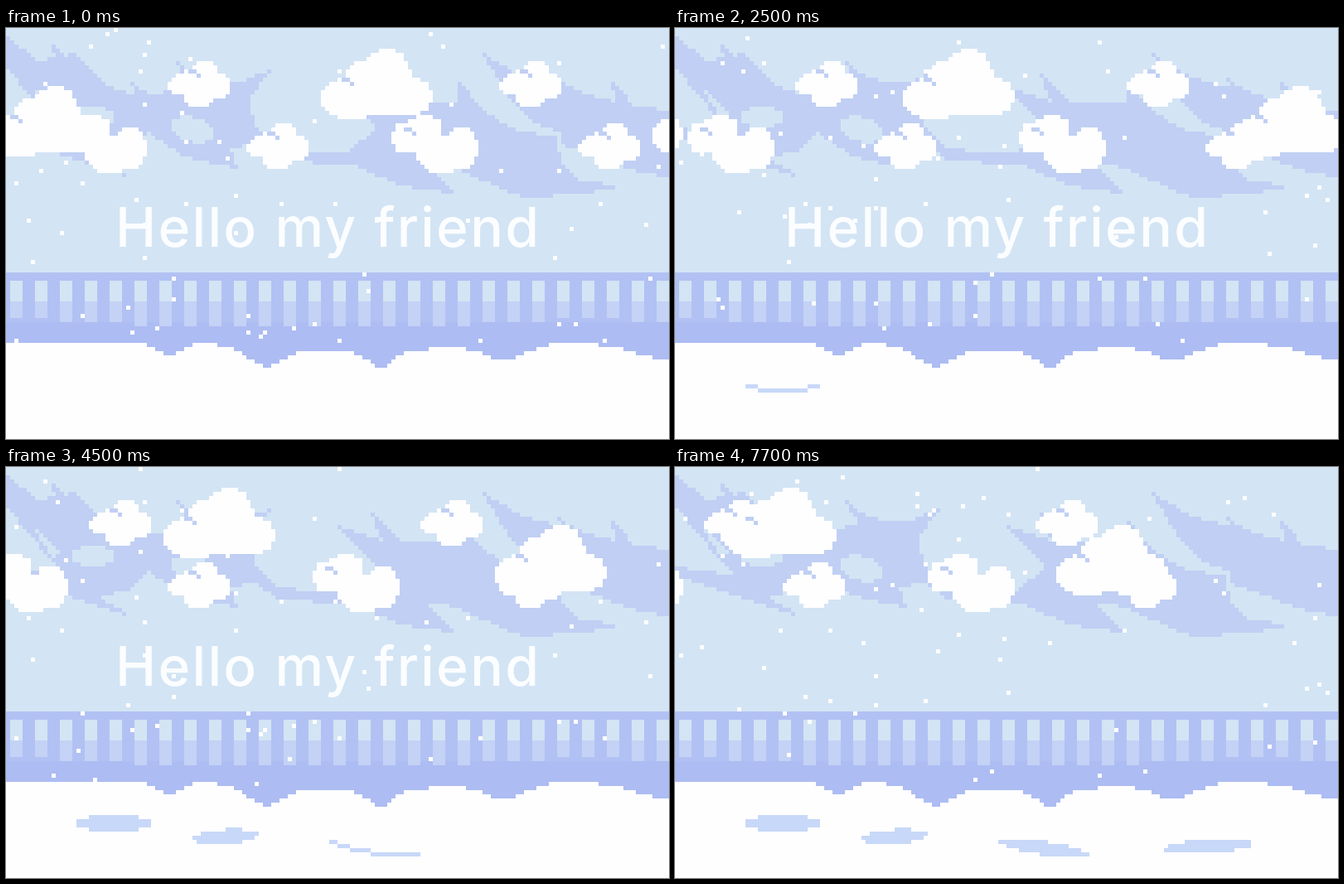
Animation of 800x496 px, one loop 7800 ms. Source, as an HTML page with a canvas:

```html
<!DOCTYPE html>
<html lang="en">
<head>
<meta charset="utf-8">
<title>Snowy day</title>
<style>
html, body { margin: 0; width: 100%; height: 100%; overflow: hidden; background: #d3e4f4; }
canvas { position: absolute; left: 0; top: 0; }
#hello {
  position: absolute; left: 132px; top: 207px; white-space: nowrap;
  font: 500 66px/1 Inter, "Open Sans", sans-serif; letter-spacing: 2.3px; color: #fbfdff;
}
</style>
</head>
<body>
<canvas id="stage" width="800" height="496"></canvas>
<div id="hello">Hello my friend</div>
<script>
// All drawing is on a grid of 5px cells.
const CELL = 5, COLS = 160, ROWS = 100;
const STEP = 100, STEPS = 78;
const SKY = '#d3e4f4', WISP = '#c0cff3', WHITE = '#fefeff', FENCE = '#b2c1f3', BANK = '#adbcf2',
  PALE = '#c3d2f5', HOLE = '#c8d8f8', DARK = '#22223a', ORANGE = '#dd7029', RED = '#ae2e36';

const ctx = document.getElementById('stage').getContext('2d');
const hello = document.getElementById('hello');
ctx.scale(CELL, CELL);

const rect = (color, x, y, w, h) => { ctx.fillStyle = color; ctx.fillRect(x, y, w, h); };

// Hard-edged ellipse, optionally sheared by a slope.
function blob(color, cx, cy, rx, ry, slope = 0) {
  for (let x = Math.ceil(cx - rx - .5); x + .5 < cx + rx; x++) {
    const dx = x + .5 - cx, half = ry * Math.sqrt(1 - (dx / rx) ** 2), mid = cy + slope * dx;
    const top = Math.ceil(mid - half - .5);
    rect(color, x, top, 1, Math.ceil(mid + half - .5) - top);
  }
}

// Hard-edged polygon, filled row by row through the cell centres.
function poly(color, pts) {
  const ys = pts.map(p => p[1]);
  for (let y = Math.floor(Math.min(...ys)); y < Math.max(...ys); y++) {
    const cy = y + .5, xs = [];
    pts.forEach(([x1, y1], i) => {
      const [x2, y2] = pts[(i + 1) % pts.length];
      if (y1 <= cy !== y2 <= cy) xs.push(x1 + (cy - y1) / (y2 - y1) * (x2 - x1));
    });
    xs.sort((a, b) => a - b);
    for (let i = 0; i + 1 < xs.length; i += 2) {
      const a = Math.ceil(xs[i] - .5), b = Math.ceil(xs[i + 1] - .5);
      if (b > a) rect(color, a, y, b - a, 1);
    }
  }
}
const shape = (color, s) => ({ color, pts: s.split(' ').map(p => p.split(',').map(Number)) });
const box = (color, x, y, w, h) => ({ color, pts: [[x, y], [x + w, y], [x + w, y + h], [x, y + h]] });
const draw = (shapes, move = p => p) => shapes.forEach(s => poly(s.color, s.pts.map(move)));

function seeded(seed) {
  return () => (seed = seed * 16807 % 2147483647) / 2147483647;
}

const wisps = [
  shape(WISP, '0,2 8,8 17,6 24,14 34,17 46,13 57,13 64,10 59,17 60,24 66,29 82,31 82,33 66,32 60,28 54,29 ' +
    '56,34 43,31 34,25 30,30 22,31 30,36 18,32 0,26 0,24 14,26 3,13 0,9'),
  shape(WISP, '72,31 82,30 90,24 80,14 91,18 87,9 95,18 109,18 109,12 115,20 124,25 133,26 134,33 139,37 ' +
    '150,38 140,40 125,41 106,33 101,33 109,40 95,38 84,33'),
  shape(WISP, '115,6 125,12 137,15 148,18 160,20 160,36 150,34 143,31 134,28 134,25 128,23 122,18'),
  shape(WISP, '10,2 13,6 18,9 13,10'),
  shape(WISP, '30,13 35,16 38,20 32,18'),
  shape(WISP, '40,6 43,10 50,13 45,15'),
  shape(WISP, '130,7 133,12 139,16 134,14'),
  shape(WISP, '146,12 149,15 151,19 147,18'),
  shape(SKY, '7,15 10,17 13,21 11,22')
];

// Clouds are unions of puffs [x, y, rx, ry] with a small diagonal crease.
const smallCloud = { crease: [5, 2], puffs: [[7.5, 5.5, 6, 4], [9, 3, 3.5, 3], [12, 6, 3, 3], [3, 6, 3, 2.5], [7.5, 8.5, 3.5, 2.5]] };
const mediumCloud = { crease: [3, 3], puffs: [[8, 4, 4.5, 4], [4, 5.5, 4, 4], [17, 8, 4, 5], [12, 9.5, 6, 4.5]] };
const bigCloud = { crease: [5, 7], puffs: [[16, 5, 5, 5], [14, 9, 9, 7], [7.5, 12, 7.5, 5], [20.5, 11.5, 6.5, 5]] };

function cloud({ puffs, crease: [cx, cy] }, x, y) {
  for (const [px, py, rx, ry] of puffs) blob(WHITE, x + px, y + py, rx, ry);
  for (let i = 0; i < 2; i++) rect(WISP, x + cx + 2 * i, y + cy + i, 2 - i, 1);
}

function drawClouds(step) {
  const slow = Math.round(step / 2.4), fast = Math.round(step / 1.2);
  for (let x = -41 - slow; x < COLS; x += 80) {
    cloud(smallCloud, x, 8);
    cloud(smallCloud, x + 19, 23);
    cloud(mediumCloud, x - 26, 21);
  }
  for (let x = -84 - fast; x < COLS; x += 160) {
    cloud(bigCloud, x, 5);
    cloud(bigCloud, x + 80, 14);
  }
}

function drawFence() {
  rect(FENCE, 0, 59, COLS, 12);
  rect(BANK, 0, 71, COLS, 12);
  for (let i = 0; i < 27; i++) {
    const bush = Math.max(0, Math.round(1.6 * Math.cos(i * 2 * Math.PI / 23)));
    rect(SKY, 1 + 6 * i, 61, 3, 5);
    rect(PALE, 1 + 6 * i, 66, 3, 6 - bush);
  }
}

// Dips in the snow line: [centre, depth, width]
const dips = [[39, 2.6, 4], [62, 4.7, 6], [85, 2.3, 25], [90, 3.8, 4], [120, 3.8, 7], [160, 4, 12]];
function drawGround() {
  for (let x = 0; x < COLS; x++) {
    const drop = dips.reduce((sum, [c, d, w]) => sum + d * Math.exp(-(((x - c) / w) ** 2)), 0);
    rect(WHITE, x, Math.round(76 + drop), 1, ROWS);
  }
}

// Dents show their front rim first and fill in when the dog leaves.
const dents = [
  { x: 26, y: 86, rx: 9, ry: 2, slope: 0, seen: 6, full: 27 },
  { x: 53, y: 89.2, rx: 8, ry: 1.7, slope: -.05, seen: 34, full: 38 },
  { x: 89, y: 92, rx: 11, ry: 1.6, slope: .15, seen: 43, full: 56 },
  { x: 128.5, y: 91.6, rx: 10.5, ry: 1.7, slope: -.06, seen: 65, full: 67 }
];
function drawDents(step) {
  for (const { x, y, rx, ry, slope, seen, full } of dents) {
    if (step < seen) continue;
    blob(HOLE, x, y, rx, ry, slope);
    if (step < full) blob(WHITE, x, y - 1, rx, ry, slope);
  }
}

const random = seeded(2024);
const FALL = 10 / 3, CYCLE = 48 * FALL;
const flakes = Array.from({ length: 140 }, () => [Math.floor(random() * COLS), random() * CYCLE]);
function drawSnow(step) {
  for (const [x, start] of flakes) {
    const y = Math.floor((start + step * FALL) % CYCLE);
    if (y < 78) rect(WHITE, x, y, 1, 1);
  }
}

const peekingDog = [
  box(WHITE, 22, 76, 10, 3),
  shape(DARK, '23,74 24,74 22,79 20,79'),
  shape(DARK, '31,75 32,75 34,79 32,79'),
  shape(DARK, '19,80 24,79 34,79 33,86 25,87 21,85 21,81 19,81'),
  box(ORANGE, 22, 81, 1, 1), box(ORANGE, 27, 82, 1, 1), box(ORANGE, 31, 82, 1, 1), box(ORANGE, 23, 85, 1, 1),
  box(WHITE, 27, 84, 1, 2), box(WHITE, 29, 82, 1, 4), box(WHITE, 31, 84, 1, 2)
];
const leapingDog = [
  // Body, tail, belly and paws
  shape(DARK, '83,86 85,80 93,74 98,73 93,84 87,84 84,88'),
  shape(WHITE, '95,78 98,79 98,86 93,84'),
  shape(ORANGE, '85,87 88,84 93,84 86,88'),
  box(DARK, 93, 84, 2, 1), box(DARK, 94, 87, 1, 2), box(DARK, 96, 85, 1, 1),
  // Face and scarf
  shape(WHITE, '101,69 110,68 109,79 104,80 98,77'),
  shape(RED, '96,74 98,75 99,79 103,81 109,79 108,82 104,85 99,86 96,80'),
  box(DARK, 102, 80, 3, 1),
  // Ears, eyes, nose and mouth
  shape(DARK, '98,67 101,65 111,65 111,67 104,70 100,75 97,73 99,70 92,72 93,70'),
  shape(ORANGE, '94,72 100,68 101,68 98,71'),
  box(ORANGE, 110, 67, 1, 2), box(ORANGE, 102, 70, 2, 1),
  box(DARK, 104, 69, 1, 3), box(DARK, 108, 69, 1, 3),
  box(DARK, 108, 72, 3, 4), box(DARK, 103, 74, 2, 1), box(DARK, 105, 75, 4, 1)
];
const leaps = [
  { start: 27, end: 35, from: 24, to: 52, line: 88 },
  { start: 37.1, end: 44, from: 52, to: 88, line: 91 },
  { start: 56, end: 66, from: 89, to: 129, line: 92 }
];

// Everything below the snow line stays hidden.
function drawAbove(line, shapes, move) {
  ctx.save();
  ctx.beginPath();
  ctx.rect(0, 0, COLS, line);
  ctx.clip();
  draw(shapes, move);
  ctx.restore();
}

function drawDog(step) {
  if (step >= 6 && step < 24) {
    const sink = 3 * Math.max(0, 9 - step, step - 19);
    drawAbove(87, peekingDog, ([x, y]) => [x, y + sink]);
  }
  for (const { start, end, from, to, line } of leaps) {
    const p = (step - start) / (end - start);
    if (p < 0 || p >= 1) continue;
    const x = Math.round(from + (to - from) * p), y = Math.round(line + 12 - 168 * p * (1 - p));
    const turn = (p - .2) * 1.6, cos = Math.cos(turn), sin = Math.sin(turn);
    drawAbove(line, leapingDog, ([px, py]) => {
      const dx = px - 97, dy = py - 77;
      return [x + dx * cos - dy * sin, y + dx * sin + dy * cos];
    });
  }
}

function render(step) {
  rect(SKY, 0, 0, COLS, ROWS);
  draw(wisps);
  blob(SKY, 21, 21.5, 5, 2.5);
  blob(SKY, 45, 24.5, 5, 3, .2);
  drawClouds(step);
  drawFence();
  drawGround();
  drawDents(step);
  drawSnow(step);
  drawDog(step);
  hello.hidden = step === STEPS - 1;
}

const begin = performance.now();
let shown = -1;
function tick() {
  const step = Math.floor((performance.now() - begin) / STEP) % STEPS;
  if (step !== shown) render(shown = step);
  requestAnimationFrame(tick);
}
tick();
</script>
</body>
</html>
```
